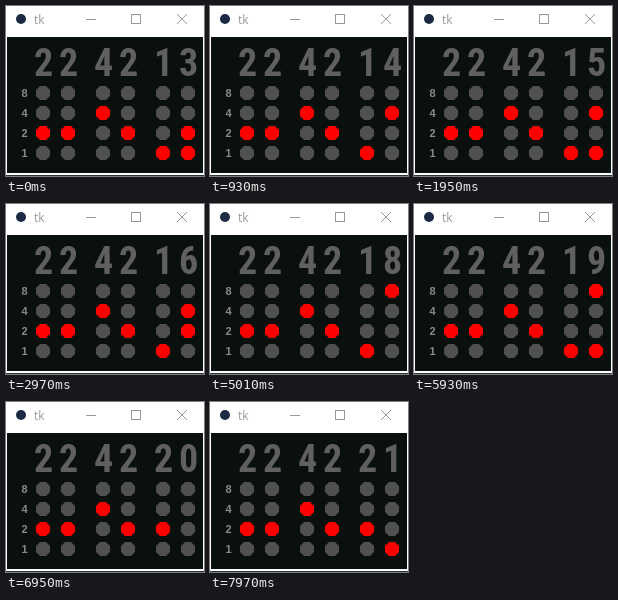
Animation, 198 px wide and 170 px high, one loop 8920 ms. Source, as an HTML page:

```html
<!DOCTYPE html>
<html lang="en">
<head>
<meta charset="utf-8">
<title>Binary clock</title>
<style>
  html, body { margin: 0; width: 100%; height: 100%; overflow: hidden; background: #fff; }
  svg { display: block; width: 198px; height: 170px; }
  .title { font: 12px "Open Sans", sans-serif; fill: #999; }
  .digit {
    font: bold 38px "Roboto Condensed", "Open Sans Condensed", "Liberation Sans Narrow", "Open Sans", sans-serif;
    font-stretch: condensed;
    fill: #606060;
    text-anchor: middle;
  }
  .label { font: bold 11px "Liberation Sans", sans-serif; fill: #8a8a8a; text-anchor: middle; }
  .buttons { fill: none; stroke: #999; }
</style>
</head>
<body>
<svg id="stage" viewBox="0 0 198 170">
  <rect width="198" height="170" fill="#fff"/>
  <circle cx="15" cy="13" r="5" fill="#1c2a44"/>
  <text class="title" x="28" y="18">tk</text>
  <g class="buttons">
    <path d="M80 13.5H90"/>
    <rect x="125.5" y="8.5" width="9" height="9"/>
    <path d="M171 8L181 18M181 8L171 18"/>
  </g>
  <rect x="1" y="31" width="196" height="136" fill="#0a100d"/>
  <rect y="169" width="198" height="1" fill="#26383c"/>
</svg>
<script>
  const LOOP = 8920;
  const TICKS = [0, 930, 1950, 2970, 3990, 5010, 5930, 6950, 7970];
  const FIRST_SECOND = 13;
  const COLUMNS = [37, 62, 97, 122, 157, 182];
  const BITS = [8, 4, 2, 1];
  const stage = document.getElementById("stage");

  function add(tag, attributes, text = "") {
    const node = document.createElementNS("http://www.w3.org/2000/svg", tag);
    for (const [name, value] of Object.entries(attributes)) node.setAttribute(name, value);
    node.textContent = text;
    return stage.appendChild(node);
  }

  const rowY = row => 87 + 20 * row;
  BITS.forEach((bit, row) => add("text", { class: "label", x: 18.5, y: rowY(row) + 4 }, bit));

  const columns = COLUMNS.map(x => ({
    digit: add("text", { class: "digit", x: x + 0.5, y: 70 }),
    dots: BITS.map((bit, row) => add("path", {
      d: `M${x - 3} ${rowY(row) - 7}h6l4 4v6l-4 4h-6l-4-4v-6z`
    }))
  }));

  function show(time) {
    const tick = TICKS.findLastIndex(start => time >= start);
    const digits = "2242" + (FIRST_SECOND + tick);
    columns.forEach(({ digit, dots }, i) => {
      digit.textContent = digits[i];
      dots.forEach((dot, row) => dot.setAttribute("fill", digits[i] & BITS[row] ? "#f00" : "#505050"));
    });
  }

  const start = performance.now();
  function frame() {
    show((performance.now() - start) % LOOP);
    requestAnimationFrame(frame);
  }
  frame();
</script>
</body>
</html>
```
